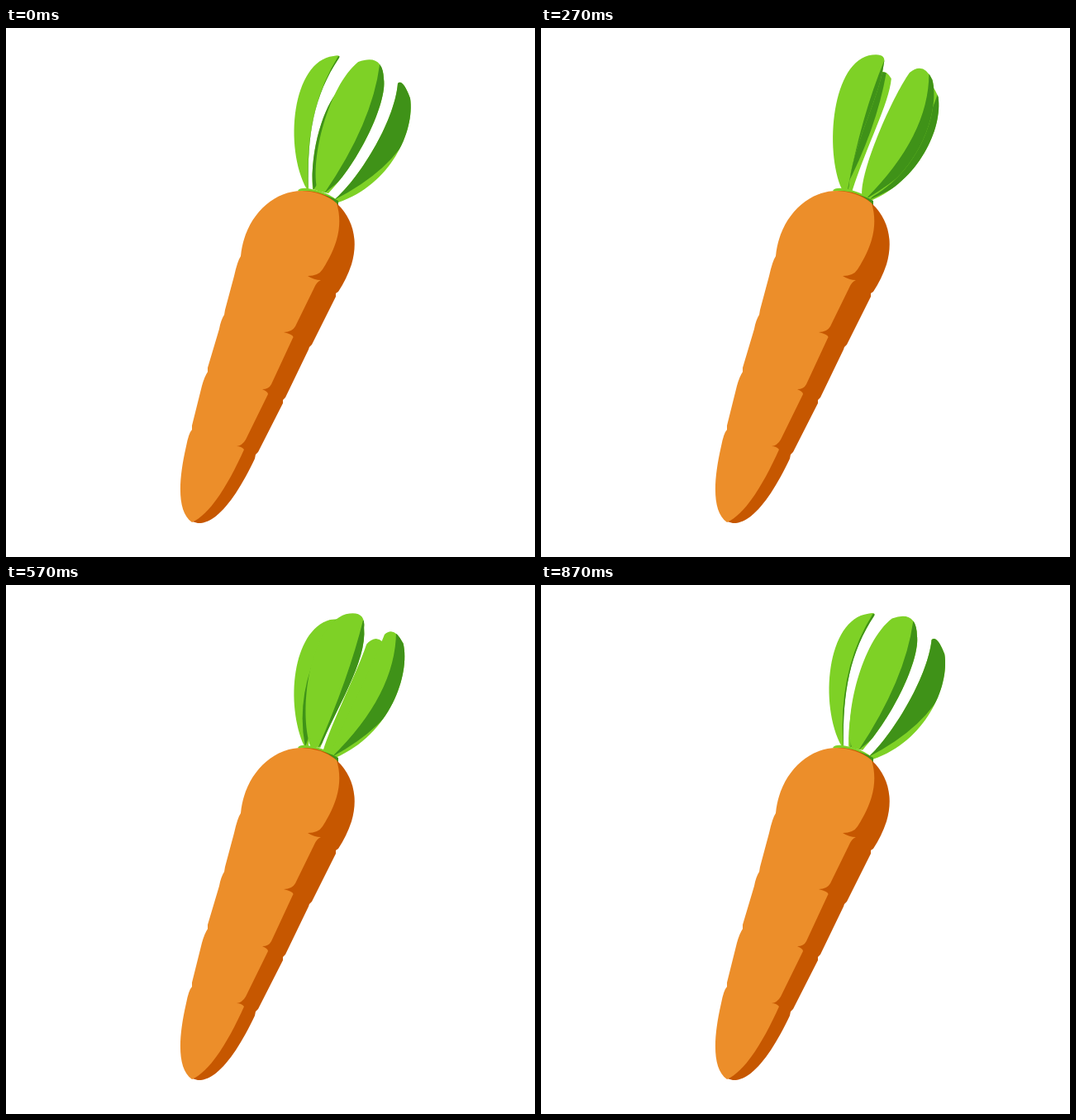
Write an HTML page without scripts that moves like this. It is 640 by 640 pixels and loops after 900 ms.

```html
<!DOCTYPE html>
<html lang="en">
<head>
<meta charset="utf-8">
<title>Carrot</title>
<style>
html, body { margin: 0; width: 100%; height: 100%; overflow: hidden; background: #fff; }
svg, .leaf, .shade { position: absolute; inset: 0; width: 100%; height: 100%; }
svg { z-index: 4; }

/* Four copies of one leaf circle the crown, a quarter turn apart. */
.leaf, .shade { animation: 3.6s linear calc(var(--quarter) * -.9s) infinite; }
.leaf { background: #7ed126; animation-name: outline, depth; animation-timing-function: linear, step-end; }
.shade { background: #3f9218; animation-name: shade; }

@keyframes depth {
  0% { z-index: 3; }
  25% { z-index: 2; }
  50% { z-index: 0; }
  75%, 100% { z-index: 1; }
}
/* Left, front, right and back poses, with in-betweens where the edges bend most. */
@keyframes outline {
  0%, 100% { clip-path: path("M364 195C336 145 346 40 396 34Q405 32 403 36C372 82 364 130 366 195Z"); }
  10.83% { clip-path: path("M364 195C346 150 354 38 403 32Q424 30 420 46C424 94 382 145 375 195Z"); }
  25% { clip-path: path("M377 197C367 160 390 70 426 41Q456 30 457 62C461 90 428 161 390 200Z"); animation-timing-function: ease-out; }
  35.83% { clip-path: path("M390 204C388 176 430 86 449 56Q464 42 476 63C486 99 465 175 397 208Z"); }
  50% { clip-path: path("M397 208C425 185 470 115 474 67Q480 61 489 85C495 125 465 190 402 211Z"); animation-timing-function: cubic-bezier(.3, 0, 1, 1); }
  75% { clip-path: path("M371 195C368 145 385 95 402 76Q425 50 440 75C445 110 415 160 386 199Z"); }
  90.83% { clip-path: path("M361 195C338 145 346 55 392 42Q404 40 406 46C395 70 372 120 366 195Z"); }
}
/* The dark band sweeps over the leaf and is cut by its outline. */
@keyframes shade {
  0%, 100% { clip-path: path("M366 196Q360 101 402 34L410 34Q380 110 366 196Z"); }
  10.83% { clip-path: path("M373 196Q399 111 421 42L440 42Q430 120 373 196Z"); }
  25% { clip-path: path("M385 200Q443 115 452 44L475 50Q475 130 385 200Z"); animation-timing-function: ease-out; }
  35.83% { clip-path: path("M394 208Q475 131 472 54L495 60Q500 150 394 208Z"); animation-timing-function: cubic-bezier(.7, 0, 1, .8); }
  50% { clip-path: path("M397 208Q440 140 472 62L500 60Q510 150 397 208Z"); animation-timing-function: ease-in; }
  66% { clip-path: path("M400 206Q530 130 520 60L560 60Q580 150 400 206Z"); }
  75% { clip-path: path("M372 196Q360 110 395 65L425 62Q420 125 372 196Z"); }
  90.83% { clip-path: path("M362 196Q347 118 399 41L410 44Q390 120 362 196Z"); }
}
</style>
</head>
<body>
<div class="leaf" style="--quarter: 0"><div class="shade"></div></div>
<div class="leaf" style="--quarter: 1"><div class="shade"></div></div>
<div class="leaf" style="--quarter: 2"><div class="shade"></div></div>
<div class="leaf" style="--quarter: 3"><div class="shade"></div></div>
<svg viewBox="0 0 640 640">
  <!-- collar -->
  <path fill="#7ed126" d="M353 197Q355 193 365 194Q390 198 402 210L401 216L370 204Z"/>
  <path fill="#3f9218" d="M372 199Q390 202 402 209L402 216L385 208Z"/>
  <!-- root: lit side over the shaded silhouette -->
  <path fill="#c65700" d="M358 197Q384 196 401 213C419 230 427 256 418 286Q412 304 402 319L399 321L399 325L370 383L367 386L366 389L338 447L335 450L335 454L305 513L302 516L301 521C280 565 256 600 232 599L225 597Z"/>
  <path fill="#ec8e2a" d="M358 197C320 197 288 232 284 276Q280 282 276 300L265 341L264 347Q260 353 258 364L244 411L244 416Q240 422 237 433L225 481L225 486Q221 490 218 506C209 545 206 585 225 598C248 588 271 548 288 510Q285 506 279 506Q286 505 290 498L317 443Q317 440 310 437Q318 437 321 431L347 375Q350 372 336 368Q346 368 350 361L373 314Q376 307 381 305Q373 305 365 300Q378 300 383 292C401 264 408 238 400 212Q383 198 358 197Z"/>
</svg>
</body>
</html>
```
